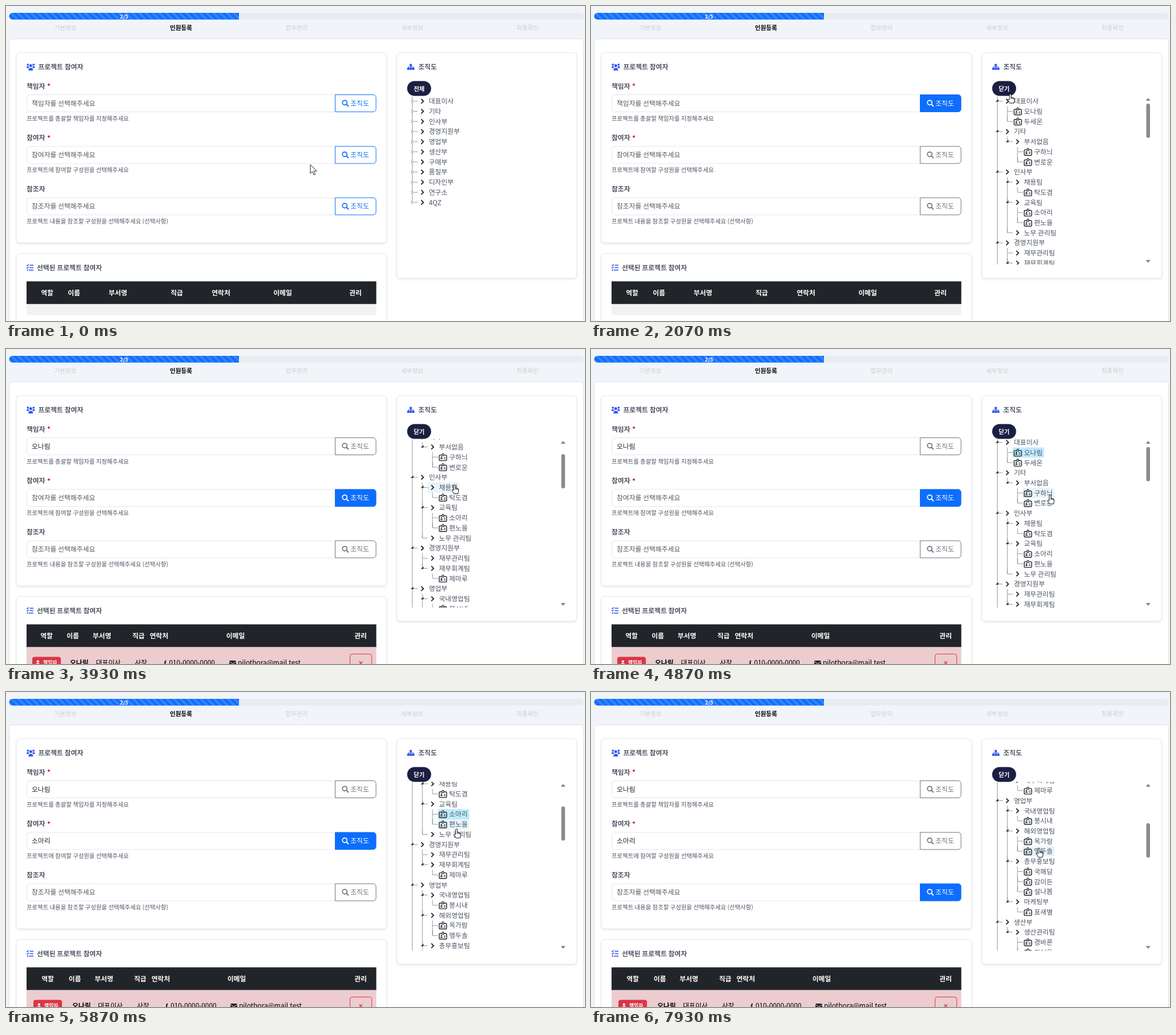
An HTML page with a canvas that plays this animation: 1014 by 552 pixels, repeating every 8000 ms.

```html
<!DOCTYPE html>
<html lang="ko">
<head>
<meta charset="utf-8">
<title>인원등록</title>
<style>
html, body { margin: 0; width: 100%; height: 100%; overflow: hidden; background: #f1f4f9; }
canvas { display: block; width: 1014px; height: 552px; }
</style>
</head>
<body>
<canvas id="stage"></canvas>
<script>
const canvas = document.getElementById('stage');
const ctx = canvas.getContext('2d');
const ratio = window.devicePixelRatio || 1;
canvas.width = 1014 * ratio;
canvas.height = 552 * ratio;

const LOOP = 8000, REM = 11.82, ROW = 17.73;
const FONT = '"Noto Sans CJK KR", "Noto Sans CJK", "Noto Sans", sans-serif';
const ACCENT = '#3357f0', INK = '#212529', MUTED = '#4d5463', RED = '#dc3545';

// '>' marks depth, '*' marks a person
const TREE = ('대표이사,>*오나림,>*두세온,기타,>부서없음,>>*구하늬,>>*변로운,' +
  '인사부,>채용팀,>>*탁도겸,>교육팀,>>*소아리,>>*편노을,>노무 관리팀,' +
  '경영지원부,>재무관리팀,>재무회계팀,>>*제마루,' +
  '영업부,>국내영업팀,>>*봉시내,>해외영업팀,>>*옥가람,>>*맹두솔,' +
  '>총무홍보팀,>>*국해담,>>*감이든,>>*설나봄,>마케팅부,>>*표새별,' +
  '생산부,>생산관리팀,>>*경바론,>>*곽여울,구매부,품질부,디자인부,연구소,4QZ')
  .split(',').map(s => ({
    depth: s.lastIndexOf('>') + 1,
    person: s.includes('*'),
    name: s.replace(/[>*]/g, '')
  }));
const ROOTS = TREE.filter(n => !n.depth);

const OPEN_AT = 1900, PICK_1 = 2400, PICK_2 = 5480, PICK_3 = 6250;
const POINTER = [
  [150, 533, 278], [700, 614, 171], [1150, 614, 171], [1650, 722, 146], [1950, 722, 146],
  [2300, 772, 182], [2640, 772, 182], [2930, 629.5, 261], [3450, 629.5, 261],
  [3900, 785, 238], [4250, 785, 238], [4650, 803.5, 256], [4900, 803.5, 256],
  [5250, 790, 214], [5600, 790, 214], [5870, 788.5, 240.3], [6010, 788, 247],
  [6350, 788, 247], [6850, 622.5, 351], [7100, 622.5, 351], [7480, 782, 271], [7930, 784, 274]
];
const SCROLL = [
  [3700, 0], [4000, 73.9], [4300, 73.9], [4600, 0],
  [4840, 0], [5140, 147.8], [7400, 147.8], [7700, 295.6]
];

const BLUE = [13, 110, 253], GRAY = [108, 117, 125], WHITE = [255, 255, 255];
const idle = { edge: BLUE, fg: BLUE, alpha: 0 };
const off = { edge: GRAY, fg: GRAY, alpha: 0 };
const hover = { edge: GRAY, fg: WHITE, alpha: 1 };
const active = { edge: BLUE, fg: WHITE, alpha: 1 };
const FIELDS = [
  { y: 170.5, label: '책임자', must: true, help: '프로젝트를 총괄할 책임자를 지정해주세요',
    value: '오나림', filled: PICK_1, states: [[-200, idle], [640, active], [3080, off]] },
  { y: 261, label: '참여자', must: true, help: '프로젝트에 참여할 구성원을 선택해주세요',
    value: '소아리', filled: PICK_2, states: [[-200, idle], [830, off], [2890, hover], [3080, active], [6985, off]] },
  { y: 351, label: '참조자', help: '프로젝트 내용을 참조할 구성원을 선택해주세요 (선택사항)',
    value: '', filled: LOOP, states: [[-200, idle], [830, off], [6760, hover], [6912, active]] }
];
const HEADS = ['역할', '이름', '부서명', '직급', '연락처', '이메일', '관리'];
const HEAD_X = [
  [72, 119, 196, 299, 376.5, 484.5, 612],
  [71, 117, 168, 232, 268, 402, 621],
  [73, 120.5, 171.5, 235, 271, 404, 621]
];

const lerp = (a, b, p) => a + (b - a) * p;
const mix = (a, b, p) => a.map((v, i) => lerp(v, b[i], p));
const easeInOut = p => p < .5 ? 2 * p * p : 1 - 2 * (1 - p) ** 2;
const easeOut = p => 1 - (1 - p) ** 2;
const css = (c, a = 1) => `rgba(${c.map(Math.round)},${a})`;

function track(keys, t) {
  const i = keys.findIndex(k => k[0] > t);
  if (i < 0) return keys[keys.length - 1].slice(1);
  if (!i) return keys[0].slice(1);
  const a = keys[i - 1], b = keys[i];
  return mix(a, b, easeInOut((t - a[0]) / (b[0] - a[0]))).slice(1);
}

function setFont(size, weight = 400) { ctx.font = `${weight} ${size}px ${FONT}`; }

// y is the optical middle of the line
function text(str, x, y, { size = REM, weight = 400, color = MUTED, align = 'left' } = {}) {
  setFont(size, weight);
  ctx.fillStyle = color;
  ctx.textAlign = align;
  ctx.fillText(str, x, y + size * .37);
}

function box(x, y, w, h, r, fill, stroke, width = 1) {
  ctx.beginPath();
  ctx.roundRect(x, y, w, h, r);
  if (fill) { ctx.fillStyle = fill; ctx.fill(); }
  if (stroke) { ctx.strokeStyle = stroke; ctx.lineWidth = width; ctx.stroke(); }
}

function line(color, width, ...pts) {
  ctx.strokeStyle = color;
  ctx.lineWidth = width;
  ctx.beginPath();
  for (let i = 0; i < pts.length; i += 2) ctx.lineTo(pts[i], pts[i + 1]);
  ctx.stroke();
}

function shape(d, x, y, fill, stroke, width = 1) {
  const path = new Path2D(d);
  ctx.save();
  ctx.translate(x, y);
  if (fill) { ctx.fillStyle = fill; ctx.fill(path); }
  if (stroke) { ctx.strokeStyle = stroke; ctx.lineWidth = width; ctx.stroke(path); }
  ctx.restore();
}

function dot(x, y, r, fill) {
  ctx.fillStyle = fill;
  ctx.beginPath();
  ctx.arc(x, y, r, 0, 7);
  ctx.fill();
}

function card(x, y, w, h) {
  ctx.save();
  ctx.shadowColor = 'rgba(0,0,0,.12)';
  ctx.shadowBlur = 4 * ratio;
  ctx.shadowOffsetY = 1.5 * ratio;
  box(x, y, w, h, 6, '#fff');
  ctx.restore();
  box(x, y, w, h, 6, null, '#e6e9ed');
}

function progress(t) {
  box(5.5, 12, 1006.5, 11.8, 6, '#e9ecef');
  ctx.save();
  ctx.beginPath();
  ctx.roundRect(5.5, 12, 402.5, 11.8, [6, 0, 0, 6]);
  ctx.clip();
  ctx.fillStyle = css(BLUE);
  ctx.fillRect(5, 12, 403, 12);
  const shift = 5.5 + REM * (1 - t / 1000 % 1);
  for (let k = -3; k < 36; k++)
    shape('M0 0H5.91L17.73 11.82H11.82Z', shift + k * REM, 12, 'rgba(255,255,255,.15)');
  ctx.restore();
  text('2/5', 206.7, 18.6, { size: 9.2, weight: 700, color: '#fff', align: 'center' });
  ['기본정보', '인원등록', '업무관리', '세부정보', '최종확인'].forEach((s, i) =>
    text(s, 104 + i * 202.4, 38, {
      size: 10.6, weight: i === 1 ? 700 : 400, color: i === 1 ? '#000' : '#cbcdd0', align: 'center'
    }));
}

function titles() {
  const style = { weight: 600 };
  dot(43.3, 104.5, 2.5, ACCENT);
  shape('M-4 5.5Q-4 1-1 1H1Q4 1 4 5.5Z', 43.3, 107.5, ACCENT);
  for (const s of [-1, 1]) {
    dot(43.3 + s * 5, 102.8, 1.9, ACCENT);
    box(43.3 + s * 5.2 - 2.1, 105.6, 4.2, 3.2, 1.5, ACCENT);
  }
  text('프로젝트 참여자', 56.5, 107, style);

  for (const [x, y] of [[706.8, 101.5], [702.5, 108], [706.8, 108], [711.2, 108]])
    box(x, y, 4.2, 4, 1, ACCENT);
  line(ACCENT, 1.1, 704.6, 109, 704.6, 106.7, 713.3, 106.7, 713.3, 109);
  line(ACCENT, 1.1, 708.9, 104, 708.9, 109);
  text('조직도', 722, 107, style);

  [454.3, 458.5, 462.7].forEach((y, i) => {
    line(ACCENT, 1.6, i < 2 ? 41.5 : 40, y, 48, y);
    if (i < 2) line(ACCENT, 1.3, 36.3, y - .3, 37.6, y + 1, 40, y - 1.8);
    else dot(37.8, y, 1.2, ACCENT);
  });
  text('선택된 프로젝트 참여자', 54, 458.5, style);
}

function buttonLook(states, t) {
  const i = states.findLastIndex(s => s[0] <= t);
  const [start, to] = states[i], from = states[Math.max(0, i - 1)][1];
  const p = easeOut(Math.min(1, (t - start) / 150));
  const alpha = lerp(from.alpha, to.alpha, p);
  const bg = alpha ? mix(from.edge, to.edge, to.alpha * p / alpha) : to.edge;
  return { bg: css(bg, alpha), fg: css(mix(from.fg, to.fg, p)), edge: css(mix(from.edge, to.edge, p)) };
}

function field({ y, label, must, help, value, filled, states }, t) {
  text(label, 36, y - 30, { weight: 600 });
  if (must) text('*', 72, y - 29.5, { weight: 700, color: '#c8102e' });
  box(36.5, y - 15, 540, 30, [5, 0, 0, 5], '#fff', '#e3e6ea');
  const done = t >= filled;
  text(done ? value : label + '를 선택해주세요', 45, y, { color: done ? INK : '#54595f' });
  const look = buttonLook(states, t);
  box(576.5, y - 15, 71.5, 30, [0, 5, 5, 0], look.bg, look.edge);
  ctx.strokeStyle = look.fg;
  ctx.lineWidth = 1.7;
  ctx.beginPath();
  ctx.arc(593.2, y - 1.2, 4, 0, 7);
  ctx.stroke();
  line(look.fg, 2, 596.2, y + 1.8, 600, y + 5.6);
  text('조직도', 603.2, y, { color: look.fg });
  text(help, 36, y + 26.3, { size: 10.4 });
}

function table(t) {
  const stage = t < PICK_1 ? 0 : t < PICK_2 ? 1 : 2;
  box(36, 482.5, 612.5, 40, 0, INK);
  HEADS.forEach((s, i) =>
    text(s, HEAD_X[stage][i], 503, { weight: 700, color: '#fff', align: 'center' }));
  if (!stage) {
    box(36, 522.5, 612.5, 19, 0, '#f2f2f2');
    return;
  }
  box(36, 522.5, 612.5, 30, 0, '#eccccf');
  const y = 550, wide = stage - 1, ink = { color: '#000' };
  const badge = 46 + 2 * wide;
  box(badge, 539.5, 50, 21, 4, RED);
  dot(badge + 9.8, 547.6, 2.1, '#fff');
  shape('M-3.8 4.5Q-3.8 1-1 1H1Q3.8 1 3.8 4.5Z', badge + 9.8, 549.5, '#fff');
  text('책임자', badge + 19, y, { size: 8.87, weight: 700, color: '#fff' });
  text('오나림', 112 + 4 * wide, y, { weight: 700, color: '#000' });
  text('대표이사', 157.5 + 3.5 * wide, y, ink);
  text('사장', 225.5 + 3.7 * wide, y, ink);
  const phone = 285.5 + 2.7 * wide, mail = 406 + 2 * wide;
  shape('M-4-4Q-7 0-4 5', phone - 1.5, 550, null, INK, 2.2);
  text('010-0000-0000', phone, y, ink);
  box(mail - 15, 546, 12, 9, 1.5, INK);
  line('#eccccf', 1, mail - 15, 547.8, mail - 9, 551.5, mail - 3, 547.8);
  text('pilotbora@mail.test', mail, y, ink);
  box(602.5, 534.5, 38, 28, 4, null, RED);
  shape('M-2.7-2.7L2.7 2.7M2.7-2.7L-2.7 2.7', 621.3, y, null, RED, 1.3);
}

function personIcon(x, y) {
  box(x - 6.5, y - 3.8, 13, 9.8, 1.5, null, INK, 1.4);
  box(x - 1.4, y - 6.4, 2.8, 4, 1, '#fff', INK, 1.2);
  dot(x - 2.5, y, 1.3, INK);
  box(x - 4.5, y + 1.9, 4, 1.8, .8, INK);
  line(INK, 1.1, x + 1.5, y + .4, x + 4.5, y + .4);
  line(INK, 1.1, x + 1.5, y + 2.8, x + 4.5, y + 2.8);
}

function tree(t, scroll, [px, py]) {
  const open = t >= OPEN_AT;
  const rows = open ? TREE : ROOTS;
  const chosen = t < PICK_1 ? '' : t < PICK_2 ? '오나림' : t < PICK_3 ? '소아리' : '노무 관리팀';
  const top = 158 - scroll, rowY = i => top + (i + .5) * ROW;
  let pointing = false;

  ctx.save();
  ctx.beginPath();
  ctx.rect(702, 157.5, 278, 295.5);
  ctx.clip();
  rows.forEach(({ depth, person, name }, i) => {
    const x = 711.5 + depth * ROW, y = rowY(i);
    const next = rows.findIndex((n, j) => j > i && n.depth <= depth);
    const sibling = next > 0 && rows[next].depth === depth;
    line('#999', 1, x, y - ROW / 2, x, sibling ? rowY(next) : y);
    line('#999', 1, x, y, x + 9.5, y);

    setFont(REM);
    const left = x + 9, right = x + 31.8 + ctx.measureText(name).width;
    const over = px > left && px < right && Math.abs(py - y) < ROW / 2 && py > 157;
    pointing = pointing || over;
    if (name === chosen) box(left, y - ROW / 2, right - left, ROW, 1.5, '#beebff');
    else if (over) box(left, y - ROW / 2, right - left, ROW, 1.5, '#e7f4f9');

    const parent = open && rows[i + 1] && rows[i + 1].depth > depth;
    if (parent) shape('M2-3.5V1H-3Z', x, y, '#333');
    else if (!open) shape('M-1.5-2.7L1.7 0L-1.5 2.7Z', x, y, '#fff', '#999', .8);

    if (person) personIcon(x + 18.2, y + .2);
    else line(INK, 1.8, x + 15.6, y - 4, x + 19.6, y, x + 15.6, y + 4);
    text(name, x + 29, y);
  });
  ctx.restore();

  if (open) {
    shape('M-4 2.5L0-2.5L4 2.5Z', 975.7, 163.5, '#858585');
    shape('M-4-2.5L0 2.5L4-2.5Z', 975.7, 447.5, '#858585');
    box(972.5, 171 + scroll * .2, 6.5, 60, 3.2, '#8b8b8b');
  }
  box(702.5, 131.5, 42, 26, 13, '#1b1f42');
  text(open ? '닫기' : '전체', 723.5, 145, { size: 10.4, weight: 700, color: '#fff', align: 'center' });
  return pointing;
}

function pointer([x, y], pointing) {
  const onPill = x > 702 && x < 745 && y > 131 && y < 158;
  const onButton = x > 576 && x < 648 && FIELDS.some(f => Math.abs(y - f.y) < 15);
  if (pointing || onPill || onButton)
    shape('M-1.5 1.3Q0-.8 1.5 1.3V6L5.8 7.2Q7.5 7.8 7.3 10.3L6.2 16.3H-.8L-4.5 10.6Q-4.4 8.4-1.5 10.3Z' +
      'M1.5 6V9M3.6 6.8V9.2M5.6 7.4V9.6', x + .5, y - .7, '#fff', '#111', 1);
  else
    shape('M0 0V15.4L3.6 12.2L6.2 18L8.7 16.9L6.2 11.2H11Z', x, y, '#fff', '#222', 1);
}

function draw(now) {
  const t = now % LOOP;
  const at = track(POINTER, t), [scroll] = track(SCROLL, t);
  ctx.setTransform(ratio, 0, 0, ratio, 0, 0);
  ctx.fillStyle = '#f1f4f9';
  ctx.fillRect(0, 0, 1014, 552);
  progress(t);
  box(5.5, 57.5, 1006, 520, 5, '#fff', '#dee2e6');
  card(18, 82, 648.5, 333);
  card(18, 433.5, 648.5, 200);
  card(684.5, 82, 315, 395);
  titles();
  FIELDS.forEach(f => field(f, t));
  table(t);
  pointer(at, tree(t, scroll, at));
}

const begin = performance.now();
(function frame() {
  draw(performance.now() - begin);
  requestAnimationFrame(frame);
})();
</script>
</body>
</html>
```
